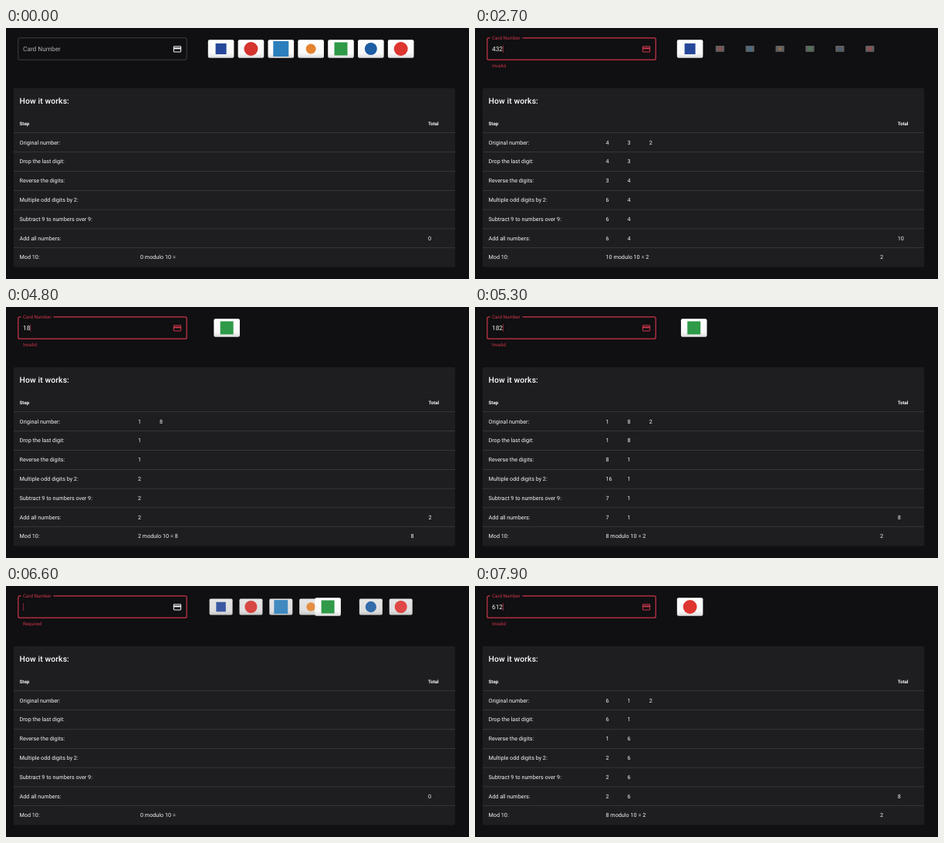
Animation of 600 by 325 pixels, one loop 8 s. Source, as an HTML page with a canvas:

```html
<!DOCTYPE html>
<html lang="en">
<head>
<meta charset="utf-8">
<title>Card number check</title>
<style>
  html, body { margin: 0; width: 100%; height: 100%; overflow: hidden; background: #100f11; }
  canvas { display: block; width: 600px; height: 325px; }
</style>
</head>
<body>
<canvas id="stage"></canvas>
<script>
const W = 600, H = 325, LOOP = 8000, MOVE = 500;
const BLUE = '#2c81c5', RED = '#cb364b', WHITE = '#f4f4f4';
const FOCUS = 980, TOUCHED = 2420;

const canvas = document.getElementById('stage');
const dpr = window.devicePixelRatio || 1;
canvas.width = W * dpr;
canvas.height = H * dpr;
const ctx = canvas.getContext('2d');
ctx.scale(dpr, dpr);

// Field value from each moment on
const KEYS = [
  [2420, '4'], [2500, '43'], [2580, '432'],
  [3550, '43'], [3680, '4'], [3800, ''],
  [4416, '1'], [4620, '18'], [5200, '182'],
  [5980, '18'], [6130, '1'], [6270, ''],
  [7000, '6'], [7390, '61'], [7580, '612']
];

// Which card is singled out, and when
const PICKS = [
  { card: 0, on: 2420, off: 3800 },
  { card: 4, on: 4416, off: 5200 },
  { card: 4, on: 5980, off: 6270 },
  { card: 6, on: 7390, off: LOOP }
];

// Plain mark on each card
const CARDS = [
  { shape: 'square', size: 14, color: '#27489a' },
  { shape: 'circle', size: 18, color: '#d5342f' },
  { shape: 'square', size: 20, color: '#2c7fbd' },
  { shape: 'circle', size: 13, color: '#e5832f' },
  { shape: 'square', size: 17, color: '#2f9a48' },
  { shape: 'circle', size: 16, color: '#1c5da3' },
  { shape: 'circle', size: 18, color: '#de3531' }
];

const clamp = v => Math.min(1, Math.max(0, v));
const mix = (a, b, k) => a + (b - a) * k;
const ease = v => {
  const u = clamp(v);
  return u < 0.5 ? 4 * u ** 3 : 1 - 4 * (1 - u) ** 3;
};

function text(str, x, y, size, color = WHITE, weight = 400) {
  ctx.font = `${weight} ${size}px Roboto, sans-serif`;
  ctx.fillStyle = color;
  ctx.fillText(str, x, y);
}

function roundRect(x, y, w, h, r) {
  ctx.beginPath();
  ctx.roundRect(x, y, w, h, r);
}

function fieldState(t) {
  let value = '', since = FOCUS;
  for (const [time, typed] of KEYS) {
    if (t >= time) [since, value] = [time, typed];
  }
  return { value, since };
}

function drawOutline(color, width, notch) {
  const x = 15.8, y = 12.8, w = 218.4, h = 28.4;
  ctx.save();
  ctx.beginPath();
  ctx.rect(0, 0, 250, 60);
  if (notch > 0) ctx.rect(mix(40, 19.5, notch), 9, 42 * notch, 8);
  ctx.clip('evenodd');
  roundRect(x, y, w, h, 2);
  ctx.strokeStyle = color;
  ctx.lineWidth = width;
  ctx.stroke();
  ctx.restore();
}

function drawCardIcon(color) {
  ctx.strokeStyle = ctx.fillStyle = color;
  ctx.lineWidth = 1.03;
  roundRect(217.35, 23.7, 9.3, 7.2, 0.8);
  ctx.stroke();
  ctx.fillRect(217.3, 25.3, 9.4, 2.05);
}

function drawField(t) {
  const { value, since } = fieldState(t);
  const focused = t >= FOCUS - 60;
  const touched = t >= TOUCHED;
  const accent = touched ? RED : BLUE;
  const lift = ease((t - FOCUS + 60) / 200);

  drawOutline(focused ? accent : 'rgba(255,255,255,.32)', focused ? 1.2 : 0.6, lift);
  text('Card Number', 22, mix(30, 15.2, lift), mix(8.27, 6.2, lift), focused ? accent : '#b0b0b1');
  text(value, 22, 30, 8.27);
  drawCardIcon(value ? RED : WHITE);
  if (touched) text(value ? 'Invalid' : 'Required', 22, 50.7, 6.2, RED);

  const beat = (t - since) % 1000;
  if (t >= FOCUS && beat >= 30 && beat < 530) {
    ctx.font = '8.27px Roboto, sans-serif';
    ctx.fillStyle = accent;
    ctx.fillRect(22.2 + ctx.measureText(value).width, 22.2, 0.6, 9.8);
  }
}

function drawCard(index, x, scale, alpha) {
  if (scale < 0.01) return;
  const { shape, size, color } = CARDS[index];
  ctx.save();
  ctx.globalAlpha = alpha;
  ctx.translate(x, 27);
  ctx.scale(scale, scale);
  const paper = ctx.createLinearGradient(0, -11.8, 0, 11.8);
  paper.addColorStop(0, '#ffffff');
  paper.addColorStop(0.75, '#f8f8f8');
  paper.addColorStop(1, '#dcdcdc');
  ctx.fillStyle = paper;
  roundRect(-16.8, -11.7, 33.6, 23.4, 2);
  ctx.fill();
  ctx.fillStyle = color;
  ctx.beginPath();
  if (shape === 'circle') ctx.arc(0, 0, size / 2, 0, 2 * Math.PI);
  else ctx.rect(-size / 2, -size / 2, size, size);
  ctx.fill();
  ctx.restore();
}

function drawCards(t) {
  const slot = i => 278.6 + 38.85 * i;
  const pick = PICKS.filter(p => t >= p.on).pop();
  let gone = 0;
  if (pick) {
    const reached = ease((Math.min(t, pick.off) - pick.on) / MOVE);
    gone = reached * (1 - ease((t - pick.off) / MOVE));
  }
  CARDS.forEach((_, i) => {
    if (!pick || i !== pick.card) drawCard(i, slot(i), 1 - gone, 1 - gone);
  });
  if (pick) drawCard(pick.card, mix(slot(pick.card), slot(0), gone), 1, 1);
}

function checkSteps(value) {
  const digits = [...value].map(Number);
  const dropped = digits.slice(0, -1);
  const reversed = [...dropped].reverse();
  const doubled = reversed.map((d, i) => i % 2 ? d : d * 2);
  const reduced = doubled.map(d => d > 9 ? d - 9 : d);
  const sum = reduced.reduce((a, b) => a + b, 0);
  return { sum, last: value.slice(-1), rows: [
    ['Original number:', digits],
    ['Drop the last digit:', dropped],
    ['Reverse the digits:', reversed],
    ['Multiple odd digits by 2:', doubled],
    ['Subtract 9 to numbers over 9:', reduced],
    ['Add all numbers:', reduced],
    ['Mod 10:', []]
  ] };
}

function drawTable(t) {
  const { value } = fieldState(t);
  const { rows, sum, last } = checkSteps(value);
  const count = value.length;
  const left = 174 - 1.5 * count;
  const totalX = 547 + 0.25 * count;
  const pitch = 24.83;
  const baseline = i => 150.5 + pitch * i;

  ctx.fillStyle = '#1e1d20';
  roundRect(9.7, 78, 572.3, 231.6, 2);
  ctx.fill();
  ctx.letterSpacing = '0.13px';
  text('How it works:', 17.5, 98.1, 10.33, '#ffffff', 500);
  ctx.letterSpacing = '0px';
  text('Step', 17.5, 125.5, 6.2, WHITE, 700);
  text('Total', totalX, 125.5, 6.2, WHITE, 700);

  rows.forEach(([label, digits], i) => {
    ctx.fillStyle = 'rgba(255,255,255,.2)';
    ctx.fillRect(9.7, 135.5 + pitch * i, 572.3, 0.52);
    text(label, 17.5, baseline(i), 7.23);
    digits.forEach((d, k) => text(String(d), left + 28.1 * k, baseline(i), 7.23));
  });
  text(String(sum), totalX, baseline(5), 7.23);
  text(`${sum} modulo 10 = ${last}`, left, baseline(6), 7.23);
  text(last, 524 + 0.3 * count, baseline(6), 7.23);
}

function frame(now) {
  const t = now % LOOP;
  ctx.fillStyle = '#100f11';
  ctx.fillRect(0, 0, W, H);
  ctx.textRendering = 'geometricPrecision';
  drawField(t);
  drawCards(t);
  drawTable(t);
  requestAnimationFrame(() => frame(performance.now() - start));
}

const start = performance.now();
frame(0);
</script>
</body>
</html>
```
